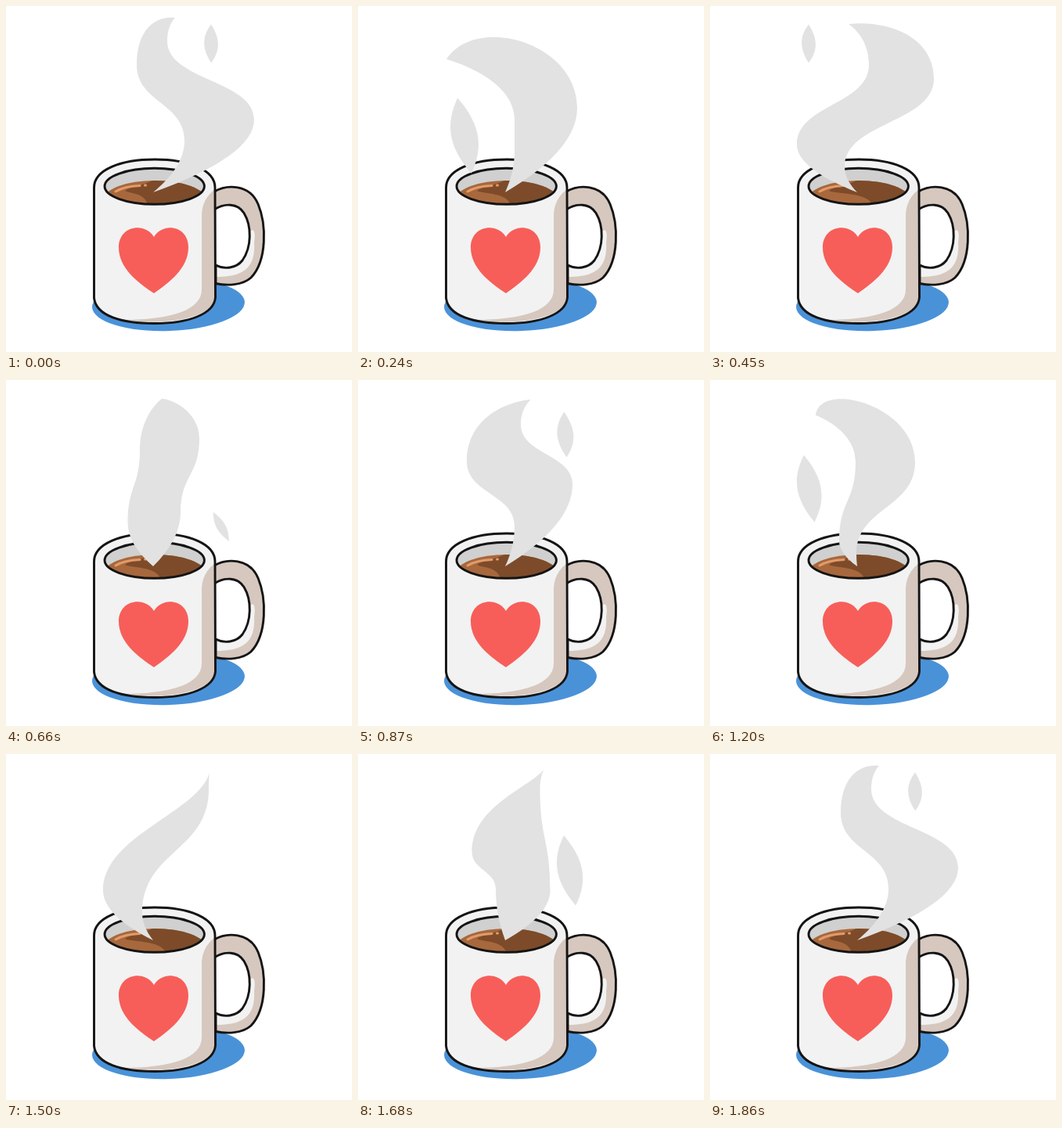
Recreate the animation shown at these times as an HTML page. Size 442 by 442 pixels, loop 1890 ms.

```html
<!DOCTYPE html>
<html lang="en">
<head>
<meta charset="utf-8">
<title>Steaming mug</title>
<style>
  html, body { margin: 0; width: 100%; height: 100%; overflow: hidden; background: #fff; }
  svg { display: block; width: 100vw; height: 100vh; }
  .line { fill: none; stroke: #141414; stroke-width: 2.9; stroke-linecap: round; stroke-linejoin: round; }
  .shade { fill: #d6c8bf; }
  .light { fill: #f2f2f2; }
  .steam { fill: #e2e2e2; }
  .shine { fill: none; stroke: #e59a69; stroke-width: 3; stroke-linecap: round; }
</style>
</head>
<body>
<svg viewBox="0 0 442 442">
  <defs>
    <clipPath id="mouth"><ellipse cx="189.700" cy="230.300" rx="63.700" ry="23"/></clipPath>
    <clipPath id="surface"><ellipse cx="190" cy="247" rx="65" ry="24"/></clipPath>
    <path id="body" d="M112.500 232C112.500 209 147 196 190 196S267 209 267 232L267.500 372C266 394 232 405.500 190 405.500S115 396 112.500 373Z"/>
    <path id="handle" d="M266 237C282 228 311 227 322 253C332.500 278 334 325 313 347C302 357 282 357.500 268 354.500V331C279 337 294 335 302 325C314 308 314 281 304 264.500C296 251.500 279 251.500 266 260Z"/>
  </defs>

  <ellipse cx="207.500" cy="381.500" rx="97.500" ry="33.500" fill="#4a92d8" transform="rotate(-2 207.500 381.500)"/>

  <use href="#handle" class="shade"/>
  <path class="light" d="M313 287C317 284 319 291 317 302C319 336 302 346 268 346V331C279 337 294 335 302 325C310 314 312 300 311 288Z"/>
  <use href="#handle" class="line"/>

  <use href="#body" class="light"/>
  <path class="shade" d="M267 234Q250 247 250 268V362C250 388 213 401 146 401C205 409 264 399 267.500 372Z"/>
  <use href="#body" class="line"/>

  <g clip-path="url(#mouth)">
    <rect x="120" y="200" width="140" height="60" fill="#d0d0d0"/>
    <g clip-path="url(#surface)">
      <rect x="120" y="200" width="140" height="60" fill="#a7683d"/>
      <path id="brew" fill="#7d4b29"/>
      <path class="shine" d="M140 237Q152 230 171 229.500M177.500 229H178.500"/>
    </g>
  </g>
  <ellipse class="line" cx="189.700" cy="230.300" rx="63.700" ry="23"/>

  <path fill="#f75e59" d="M189 367C170 354 144 336 144 308C144 281 177 275 189 295C201 275 233 281 233 308C233 336 207 354 189 367Z"/>

  <path id="plume" class="steam"/>
  <path id="wisps" class="steam"/>
</svg>

<script>
const LOOP = 1890, STEP = 30, PERIOD = LOOP - STEP;
const BASE = [188, 238];

// The turning points of each edge, where it runs straight up, low to high on the
// left and high to low on the right; the tip, and the pull of its rounded side.
const poses = [
  { at: 0,    left: [[228, 172], [167, 75]],  tip: [216, 15], pull: [-26, -3], right: [[206, 45], [317, 145]] },
  { at: 240,  left: [[200, 185], [200, 145]], tip: [113, 68], pull: [37, -58], right: [[280, 130], [280, 130]] },
  { at: 450,  left: [[111, 177], [203, 75]],  tip: [177, 23], pull: [53, -5],  right: [[286, 93], [172, 205]] },
  { at: 870,  left: [[200, 187], [139, 104]], tip: [221, 25], pull: [-35, 3],  right: [[208, 57], [274, 133]] },
  { at: 1200, left: [[165, 205], [186, 105]], tip: [135, 45], pull: [5, -45],  right: [[262, 105], [187, 222]] },
  { at: 1500, left: [[124, 174], [124, 174]], tip: [260, 24], pull: [-15, 51], right: [[259, 45], [174, 203]] }
];
poses.push({ ...poses[0], at: PERIOD });

// When and where each loose wisp passes the height PASS_Y.
const PASS_Y = 48, RISE = 0.56;
const wisps = [{ at: 0, x: 262 }, { at: 450, x: 126 }, { at: 909, x: 263 }, { at: 1362, x: 119 }];

const $ = id => document.getElementById(id);
const mix = (a, b, u) => Array.isArray(a) ? a.map((v, i) => mix(v, b[i], u)) : a + (b - a) * u;
const clamp = v => Math.max(0, Math.min(1, v));
const cubic = (...pts) => "C" + pts.flat().map(v => v.toFixed(2)).join(" ");
// Point straight above or below p, a share k of the way to the height of q.
const toward = (p, q, k) => [p[0], mix(p[1], q[1], k)];

// One edge from the base up to the tip, as a list of cubic segments.
function edge([low, high], tip, pull, weight) {
  const handle = tip.map((v, i) => v + pull[i] * weight);
  const foot = toward(low, BASE, 0.5);
  return [
    [BASE, mix(BASE, foot, 2 / 3), mix(low, foot, 2 / 3), low],
    [low, toward(low, high, 0.5), toward(high, low, 0.5), high],
    [high, toward(high, handle, 0.7), handle, tip]
  ];
}

function plume(t) {
  const n = poses.findIndex(p => p.at > t), a = poses[n - 1], b = poses[n];
  const u = (t - a.at) / (b.at - a.at);
  const [left, tip, pull, right] = ["left", "tip", "pull", "right"].map(k => mix(a[k], b[k], u));
  const up = edge(left, tip, pull, clamp(-pull[0] / 5));
  const down = edge([right[1], right[0]], tip, pull, clamp(pull[0] / 5));
  return "M" + BASE
    + up.map(s => cubic(...s.slice(1))).join("")
    + down.reverse().map(s => cubic(s[2], s[1], s[0])).join("") + "Z";
}

// A leaf that shrinks and straightens as it rises.
function wisp({ at, x }, t) {
  const age = (t - at + PERIOD * 1.5) % PERIOD - PERIOD / 2;
  const y = PASS_Y - RISE * age;
  const h = Math.min(30 + 0.4 * y, 2 * (y - 16), 3 * (200 - y));
  if (h <= 0) return "";
  const cx = x + 0.085 * (y - PASS_Y), lean = 0.075 * (y - PASS_Y), w = 0.24 * h;
  const top = [cx - lean, y - h / 2], bottom = [cx + lean, y + h / 2];
  return "M" + top
    + cubic([cx - w, y - h * 0.18], [cx - w, y + h * 0.12], bottom)
    + cubic([cx + w, y + h * 0.18], [cx + w, y - h * 0.12], top) + "Z";
}

function draw(t) {
  $("plume").setAttribute("d", plume(t));
  $("wisps").setAttribute("d", wisps.map(w => wisp(w, t)).join(""));
  const x = 194 - 13 * Math.cos(t / PERIOD * 4 * Math.PI);
  $("brew").setAttribute("d", `M190 220C182 229 160 229 152 236C158 240 ${x - 4} 238 ${x} 254H260V220Z`);
}

const start = performance.now();
function tick() {
  const t = (performance.now() - start) % LOOP;
  draw(Math.floor(t / STEP) * STEP % PERIOD);
  requestAnimationFrame(tick);
}
tick();
</script>
</body>
</html>
```
